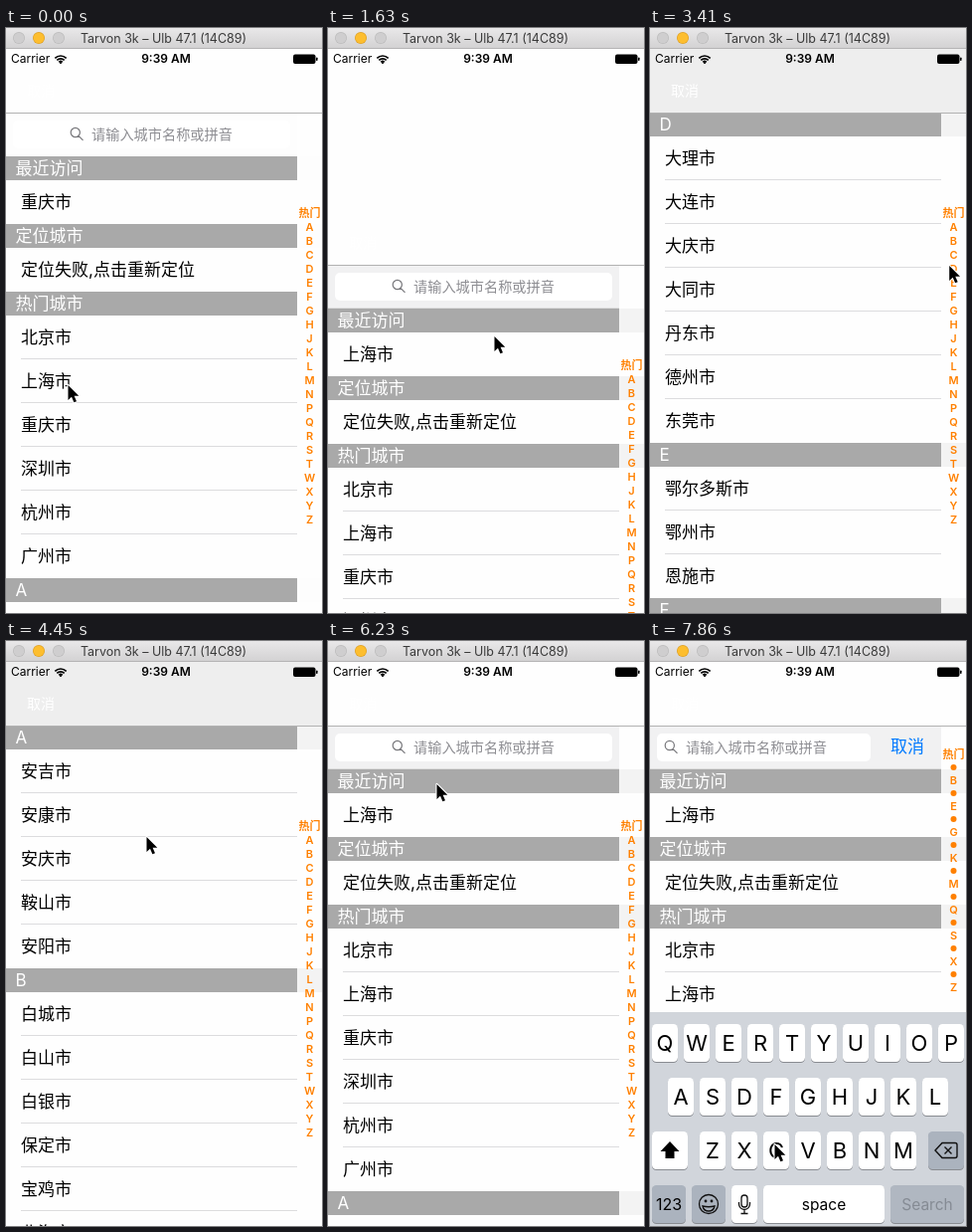
An HTML page with a canvas that plays this animation: 318 px wide and 588 px high, repeating every 8 s.

```html
<!DOCTYPE html>
<html lang="zh-CN">
<head>
<meta charset="utf-8">
<style>
html, body { margin: 0; width: 318px; height: 588px; overflow: hidden; background: #fff; }
canvas { display: block; }
</style>
</head>
<body>
<canvas id="stage" width="318" height="588"></canvas>
<script>
const c = document.getElementById('stage').getContext('2d');
const LOOP = 8000, FIRST = 290, STEP = 148.2;
const NAV = 85, HEAD = 24, ROW = 44, EDGE = 293, ORANGE = '#ff8000';

const cities = {
  A: '安吉 安康 安庆 鞍山 安阳',
  B: '白城 白山 白银 保定 宝鸡 北海 北京 蚌埠',
  C: '沧州 长春 长沙 长治 常德 常州 成都 承德 赤峰 重庆',
  D: '大理 大连 大庆 大同 丹东 德州 东莞',
  E: '鄂尔多斯 鄂州 恩施',
  F: '佛山 福州 抚顺 阜阳',
  G: '赣州 广元 广州 桂林 贵阳',
  H: '哈尔滨 海口 邯郸 杭州 合肥 衡水 呼和浩特 惠州 湖州'
};
const named = s => s.split(' ').map(x => x + '市');
const sections = [
  ['最近访问', ['重庆市']],
  ['定位城市', ['定位失败,点击重新定位']],
  ['热门城市', named('北京 上海 重庆 深圳 杭州 广州')],
  ...Object.entries(cities).map(([k, s]) => [k, named(s)])
].map(([title, rows]) => ({ title, rows }));
let end = NAV + 44;
for (const s of sections) {
  s.top = end;
  end += HEAD + s.rows.length * ROW;
}

const fullIndex = ['热门', ...'ABCDEFGHJKLMNPQRSTWXYZ'];
const shortIndex = ['热门', ...'•B•E•G•K•M•Q•S•X•Z'];

// Tracks: [step, value, ...], linear between keys
const pointer = [[-1, 62, 359], [3, 62, 359], [7, 167, 310], [10, 167, 310], [16, 299, 287],
  [17, 299, 287], [24, 302, 203], [25, 302, 203], [28, 141, 197], [29, 139, 200], [32, 127, 258],
  [33, 127, 269], [34, 127, 269], [40, 109, 144], [42, 112, 108], [45, 112, 108], [50, 122, 492], [51, 125, 506]];
const sheet = [[-1, 0], [0, 50], [1, 300], [2, 490], [3, 568], [8, 568], [9, 153], [10, 18], [11, 0]];
const fling = [[28, 468], [29, 463], [30, 405], [31, 225], [32, 50], [33, -10], [34, -2], [35, 0]];
const typing = [[42, 0], [43, .5], [44, .92], [45, 1]];

function at(track, n) {
  if (n <= track[0][0]) return track[0].slice(1);
  const i = track.findIndex(k => k[0] >= n);
  if (i < 0) return track[track.length - 1].slice(1);
  const a = track[i - 1], b = track[i], f = (n - a[0]) / (b[0] - a[0]);
  return a.slice(1).map((v, j) => v + (b[j + 1] - v) * f);
}

function rect(x, y, w, h, color) {
  c.fillStyle = color;
  c.fillRect(x, y, w, h);
}
function round(x, y, w, h, r, color) {
  c.fillStyle = color;
  c.beginPath();
  c.roundRect(x, y, w, h, r);
  c.fill();
}
function disc(x, y, r, color) {
  c.fillStyle = color;
  c.beginPath();
  c.arc(x, y, r, 0, 7);
  c.fill();
}
function text(s, x, mid, size, color, align = 'left', weight = 400) {
  c.font = `${weight} ${size}px Inter, "Noto Sans CJK SC", "Noto Sans CJK", sans-serif`;
  c.textAlign = align;
  c.fillStyle = color;
  c.fillText(s, x, mid + size * (s.charCodeAt(0) > 255 ? .38 : .36));
}
function stroke(d, color, width) {
  c.strokeStyle = color;
  c.lineWidth = width;
  c.stroke(new Path2D(d));
}
function fill(d, color) {
  c.fillStyle = color;
  c.fill(new Path2D(d));
}

function scrollAt(n, y) {
  if (n < 17) return 0;
  if (n > 24) return at(fling, n)[0];
  return sections[Math.floor((y - 179) / 14) + 2].top - NAV;
}

function searchBar(y, k, plain, caret) {
  rect(0, y, EDGE, 44, plain ? '#fdfdfd' : '#f1f1f2');
  if (!plain) {
    rect(0, y, EDGE, 1, '#cfcfcf');
    rect(0, y + 43, EDGE, 1, '#dedede');
  }
  round(7, y + 8, 279 - 64 * k, 28, 5, '#fff');
  const x = -50 * k;
  stroke(`M${74.4 + x} ${y + 20}a4.6 4.6 0 1 0 -9.2 0a4.6 4.6 0 1 0 9.2 0M${73 + x} ${y + 23.3}l4.5 4.5`, '#77777b', 1.2);
  text('请输入城市名称或拼音', 86 + x, y + 21.5, 14.2, '#8e8e93');
  if (k) {
    c.globalAlpha = k;
    text('取消', 242, y + 21, 17, '#007aff');
    c.globalAlpha = 1;
  }
  if (caret) rect(35, y + 13, 2, 17, '#4a6fe3');
}

function list(scroll, n, k) {
  const plain = n < 4;
  sections[0].rows[0] = plain ? '重庆市' : '上海市';
  searchBar(NAV - scroll, k, plain, n >= 45 && n % 4 != 3);
  for (const s of sections) {
    const top = s.top - scroll, bottom = top + HEAD + s.rows.length * ROW;
    if (bottom < NAV || top > 588) continue;
    s.rows.forEach((row, i) => {
      const y = top + HEAD + i * ROW;
      text(row, 15, y + 22, 17, '#000');
      if (i < s.rows.length - 1) rect(15, y + 43, EDGE - 15, 1, '#dcdcde');
    });
    const y = Math.min(Math.max(top, NAV), bottom - HEAD);
    rect(0, y, 318, HEAD, plain ? '#fdfdfd' : '#f3f3f3');
    rect(0, y, EDGE, HEAD, '#a9a9a9');
    text(s.title, 9.5, y + 12, 17, '#fff');
  }
}

function navBar(scroll) {
  rect(0, 20, 318, 65, '#fefefe');
  c.globalAlpha = Math.min(1, Math.max(0, scroll / 60));
  rect(0, 20, 318, 65, '#eeeeee');
  c.globalAlpha = 1;
  text('取消', 21, 63, 14, '#fff');
  rect(0, NAV, 318, 1, '#b2b2b2');
}

function indexBar(k) {
  const small = k > .4, gap = small ? 13 : 14, start = small ? 114 : 186;
  (small ? shortIndex : fullIndex).forEach((s, i) => {
    const y = start + i * gap;
    if (s == '•') disc(305.5, y, 3, ORANGE);
    else text(s, 305.5, y, 11, ORANGE, 'center', 600);
  });
}

function key(x, y, w, color, label = '', size = 22, ink = '#000') {
  round(x, y + 1, w, 38, 4.5, '#898c91');
  round(x, y, w, 38, 4.5, color);
  text(label, x + w / 2, y + 19, size, ink, 'center');
}
function keyboard(k) {
  if (!k) return;
  const dark = '#abb3be';
  c.save();
  c.translate(0, 215 * (1 - k));
  rect(0, 373, 318, 215, '#d1d5db');
  [['QWERTYUIOP', 2], ['ASDFGHJKL', 18], ['ZXCVBNM', 50]].forEach(([row, x], r) =>
    [...row].forEach((s, i) => key(x + i * 32, 385 + r * 54, 26, '#fff', s)));
  key(2, 493, 36, '#fff');
  fill('M20 503l9.5 10h-5v7h-9v-7h-5z', '#000');
  key(280, 493, 36, dark);
  stroke('M287 512l7-7.5h13q2 0 2 2v11q0 2-2 2h-13zM296.5 508.5l7 7m0-7l-7 7', '#111', 1.4);
  key(2, 547, 34, dark, '123', 16);
  key(42, 547, 34, dark);
  stroke('M68.5 566a9.5 9.5 0 1 0 -19 0a9.5 9.5 0 1 0 19 0M53 568q6 1.5 12 0q-1 5-6 5t-6-5z', '#111', 1.3);
  disc(56, 563, 1.4, '#111');
  disc(62, 563, 1.4, '#111');
  key(82, 547, 26, '#fff');
  stroke('M92 560a3 3 0 0 1 6 0v6a3 3 0 0 1-6 0zM89.5 564v2a5.5 5.5 0 0 0 11 0v-2M95 571.5v4M91.5 575.5h7', '#111', 1.3);
  key(114, 547, 122, '#fff', 'space', 15.5);
  key(242, 547, 74, '#b0b7c1', 'Search', 15.5, '#858b94');
  c.restore();
}

function statusBar() {
  text('Carrier', 5, 31, 12, '#000');
  for (const r of [3.4, 6.2, 9]) {
    c.beginPath();
    c.arc(55, 36, r - 1, -2.36, -.78);
    c.strokeStyle = '#000';
    c.lineWidth = 1.7;
    c.stroke();
  }
  disc(55, 35, 1.1, '#000');
  text('9:39 AM', 161, 31, 12, '#000', 'center', 600);
  round(289, 26.5, 22.5, 9.5, 2, '#000');
  round(312, 29.5, 1.6, 3.5, .8, '#000');
}

function titleBar() {
  const g = c.createLinearGradient(0, 0, 0, 20);
  g.addColorStop(0, '#e9e8e9');
  g.addColorStop(1, '#d3d2d3');
  rect(0, 0, 318, 20, g);
  rect(0, 20, 318, 1, '#b5b4b5');
  [['#cfcecf', '#bbb'], ['#fdbe2f', '#dfa023'], ['#cfcecf', '#bbb']].forEach(([color, rim], i) => {
    disc(13 + i * 20, 10, 6, rim);
    disc(13 + i * 20, 10, 5.3, color);
  });
  text('Tarvon 3k – Ulb 47.1 (14C89)', 158.5, 10.5, 12.5, '#3a3a3a', 'center');
}

function arrow(x, y) {
  c.save();
  c.translate(x, y);
  const d = 'M.5 0v15l3.5-3.3 2.4 5.6 2.6-1.1-2.4-5.4h4.7z';
  c.lineJoin = 'round';
  stroke(d, '#fff', 2.2);
  fill(d, '#000');
  c.restore();
}

function draw() {
  const t = performance.now() % LOOP;
  const n = Math.max(-1, Math.min(51, Math.floor((t - FIRST) / STEP)));
  const [x, y] = at(pointer, n), [drop] = at(sheet, n), [k] = at(typing, n);
  const scroll = scrollAt(n, y);
  rect(0, 0, 318, 588, '#fefefe');
  if (drop < 568) {
    c.save();
    c.translate(0, drop);
    list(scroll, n, k);
    navBar(scroll);
    indexBar(k);
    c.restore();
  }
  keyboard(k);
  statusBar();
  titleBar();
  arrow(x, y);
  requestAnimationFrame(draw);
}
draw();
</script>
</body>
</html>
```
